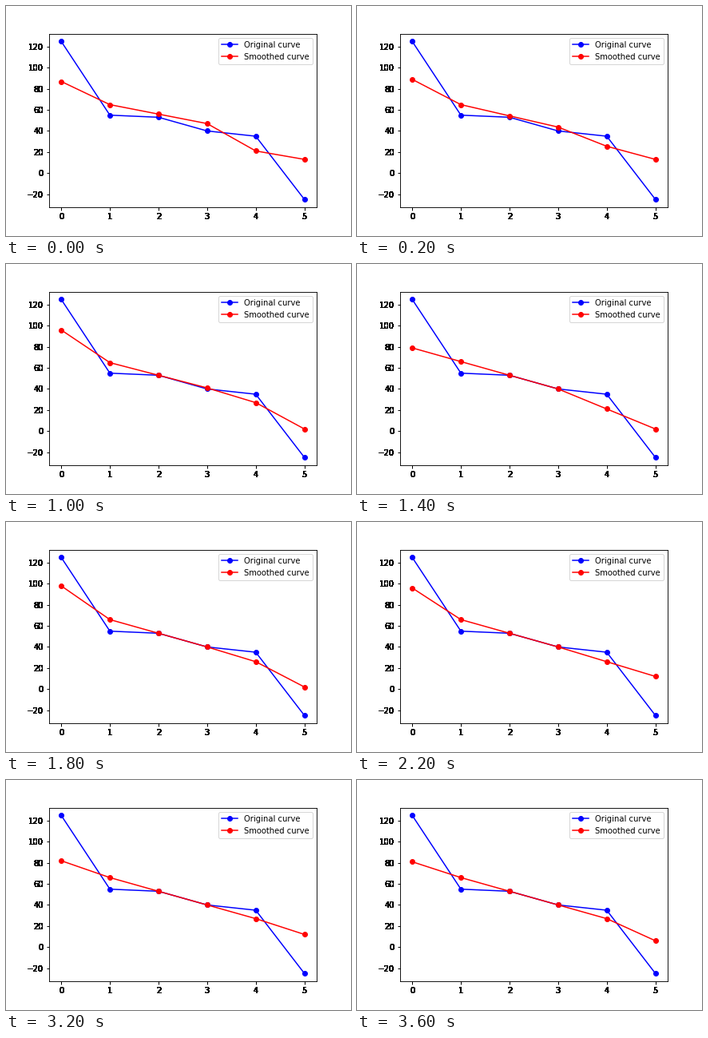
A matplotlib script for the animation above (9.8 s loop, 432 by 288 pixels).

```python
import numpy as np
import matplotlib.pyplot as plt
from matplotlib.animation import FuncAnimation
from matplotlib.axes import Axes

W, H, DPI = 432, 288, 72
STEP = 200              # ms per frame
FRAMES = 49
OVERPRINT = 45          # tick labels are printed over themselves

CURVE = [125, 55, 53, 40, 35, -25]
START = np.array([77, 68, 59, 33])      # inner points before smoothing
INNER = np.arange(1, 5)

# (frame, value): the left end glides, the right end jumps
LEFT = [(0, 87), (3, 93), (5, 96), (7, 79), (8, 99), (11, 96),
        (12, 82), (14, 84), (17, 81)]
RIGHT = [(0, 13), (3, 12), (4, 2), (11, 12), (18, 6)]


class OverprintAxes(Axes):
    def draw(self, renderer):
        super().draw(renderer)
        labels = [*self.get_xticklabels(), *self.get_yticklabels()]
        for label in labels:
            for _ in range(OVERPRINT):
                label.draw(renderer)


def smoothed(frame):
    """Inner points settle on a line through point 2; the ends wander."""
    slope = 12 if frame < 6 else 13
    line = 53 - slope * (INNER - 2)
    ease = (1 - min(frame / 3, 1)) ** 2
    inner = line + (START - 77 + 12 * (INNER - 1)) * ease
    inner[-1] -= 7 * np.exp(-((frame - 6.5) / 1.2) ** 2)
    left = round(np.interp(frame, *zip(*LEFT)))
    right = [v for t, v in RIGHT if t <= frame][-1]
    return [left, *inner, right]


plt.rcParams["font.family"] = "DejaVu Sans"
plt.rcParams["axes.linewidth"] = 0.9
fig = plt.figure(figsize=(W / DPI, H / DPI), dpi=DPI, facecolor="white")
ax = fig.add_axes([0.125, 0.125, 0.775, 0.755], axes_class=OverprintAxes)
ax.set(xlim=(-0.25, 5.25), ylim=(-32.5, 132.5),
       xticks=range(6), yticks=range(-20, 121, 20))
ax.tick_params(width=1)

xs = range(len(CURVE))
ax.plot(xs, CURVE, "bo-", label="Original curve")
smooth, = ax.plot(xs, smoothed(0), "ro-", label="Smoothed curve")
ax.legend(loc="upper right")


def update(frame):
    smooth.set_ydata(smoothed(frame))
    return smooth,


anim = FuncAnimation(fig, update, frames=FRAMES, interval=STEP,
                     repeat=True, repeat_delay=0, blit=False)
plt.show()
```
